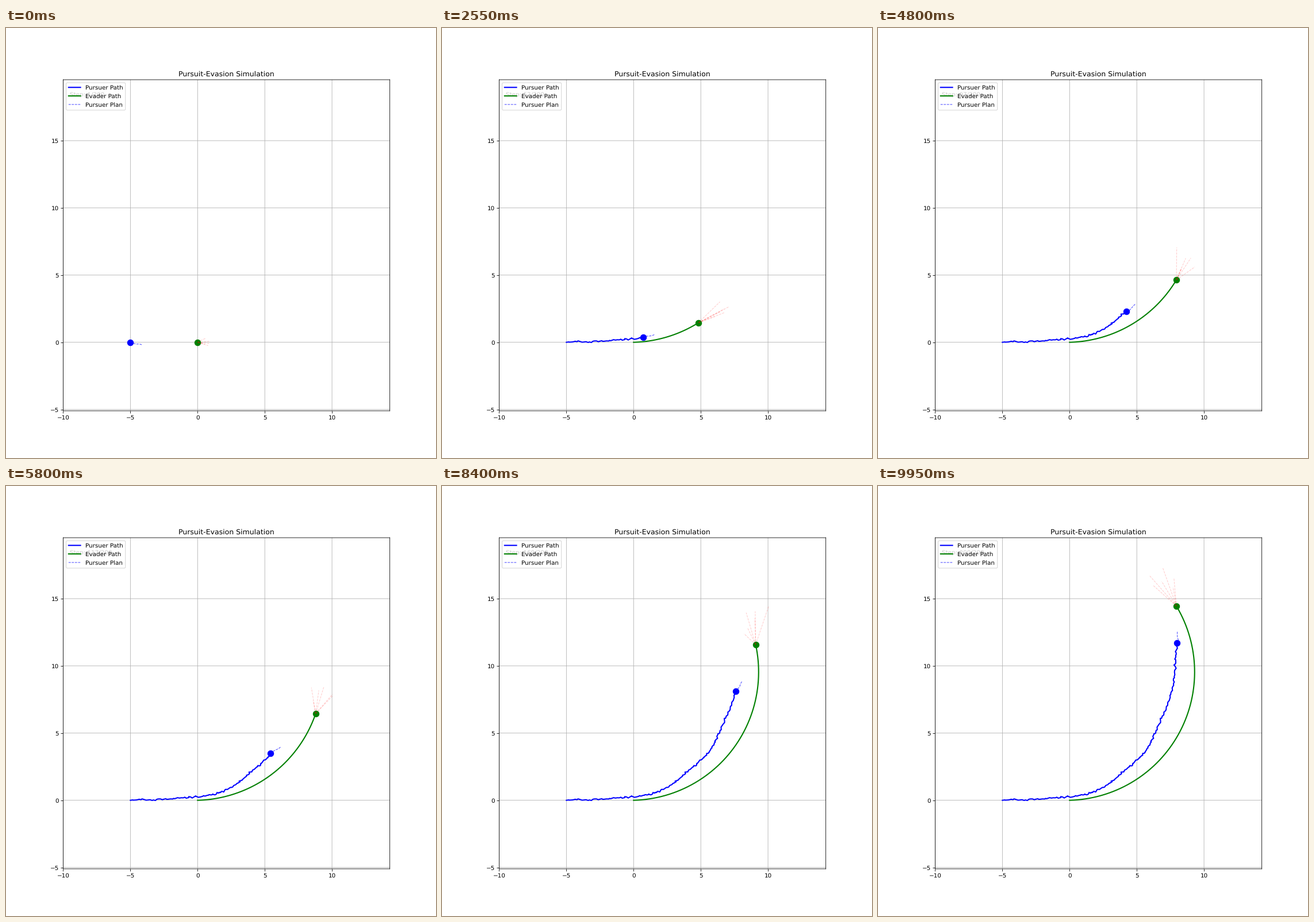
Write a matplotlib script that moves like this. It is 748 px wide and 748 px high and loops after 10 s.

```python
import numpy as np
import matplotlib.pyplot as plt
from matplotlib.animation import FuncAnimation

# Unsnapped, unhinted drawing gives soft, scaled-down edges
plt.rcParams["path.snap"] = False
plt.rcParams["text.hinting"] = "none"

STEPS = 200
SPEED = 0.1            # evader distance per step
TURN = np.pi / 300     # evader heading change per step
HEADING = 0.026
RAYS = 6

# Key moments of the chase: step, x, y
KEYS = np.array([
    (0, -5.0, 0.0), (27, -1.56, 0.14), (76, 2.6, 1.03), (99, 4.44, 2.5),
    (116, 5.47, 3.45), (140, 6.42, 5.18), (168, 7.59, 8.1),
    (199, 8.0, 11.73),
])


def polar(angle, length):
    return np.column_stack([np.cos(angle), np.sin(angle)]) * np.c_[length]


def evader_track():
    angle = HEADING + TURN * np.arange(STEPS + 1)
    x = np.sin(angle) - np.sin(HEADING)
    y = np.cos(HEADING) - np.cos(angle)
    return SPEED / TURN * np.column_stack([x, y])


def hermite(t, knots, values):
    """Smooth curve through the values at the given knots."""
    slopes = np.gradient(values, knots)
    i = np.clip(np.searchsorted(knots, t, side="right") - 1,
                0, len(knots) - 2)
    h = knots[i + 1] - knots[i]
    u = (t - knots[i]) / h
    ease = u * u * (3 - 2 * u)
    return (values[i] * (1 - ease) + values[i + 1] * ease
            + h * u * (1 - u) * ((1 - u) * slopes[i] - u * slopes[i + 1]))


def pursuer_track():
    steps = np.arange(STEPS)
    track = np.column_stack([hermite(steps, KEYS[:, 0], KEYS[:, k])
                             for k in (1, 2)])
    wobble = np.random.default_rng(4).normal(0, 0.033, track.shape)
    wobble[0] = 0
    return track + wobble


EVADER = evader_track()
PURSUER = pursuer_track()


def plan_points(step, rng):
    """Four short moves aimed roughly at the evader."""
    start = PURSUER[step]
    dx, dy = EVADER[step] - start
    angles = np.arctan2(dy, dx) + rng.normal(0, 0.1) + rng.normal(0, 0.2, 4)
    moves = polar(angles, np.full(4, 0.23))
    return np.vstack([start, start + np.cumsum(moves, axis=0)])


def fan_tips(step, rng):
    """Ends of the predicted evader moves, longer after the start."""
    spread = np.clip(rng.normal(0, 0.32, RAYS), -0.6, 0.6)
    reach = np.clip(rng.normal(1.75, 0.55, RAYS), 0.9, 3.0)
    reach *= min(1, 0.45 + step / 30)
    return EVADER[step] + polar(HEADING + TURN * step + spread, reach)


fig, ax = plt.subplots(figsize=(10, 10), dpi=74.8)
# A quarter pixel right and down
fig.subplots_adjust(left=0.1253, right=0.9003, bottom=0.1097, top=0.8797)
ax.set_xlim(-10, EVADER[:, 0].max() + 5)
ax.set_ylim(-5.1, EVADER[:, 1].max() + 5)
ax.set_aspect("equal")
ax.grid(True)
ax.set_title("Pursuit-Evasion Simulation")

blue_path, = ax.plot([], [], "b-", lw=2, label="Pursuer Path")
green_path, = ax.plot([], [], "g-", lw=2, label="Evader Path")
blue_dot, = ax.plot([], [], "bo", ms=10)
green_dot, = ax.plot([], [], "go", ms=10)
plan, = ax.plot([], [], "b--", lw=1, alpha=0.7, label="Pursuer Plan")
fan = [ax.plot([], [], "r--", lw=1, alpha=0.2)[0] for _ in range(RAYS)]
counter = ax.text(0.02, 0.95, "", transform=ax.transAxes)
ax.legend(loc="upper left")


def update(step):
    rng = np.random.default_rng(step + 40)
    prey = EVADER[step]
    for track, path, dot in ((PURSUER, blue_path, blue_dot),
                             (EVADER, green_path, green_dot)):
        path.set_data(*track[:step + 1].T)
        dot.set_data(*track[step:step + 1].T)
    plan.set_data(*plan_points(step, rng).T)
    for line, tip in zip(fan, fan_tips(step, rng)):
        line.set_data(*np.column_stack([prey, tip]))
    counter.set_text(f"Step: {step + 1}/{STEPS}")
    return [blue_path, green_path, blue_dot, green_dot, plan, *fan, counter]


anim = FuncAnimation(fig, update, frames=STEPS, interval=50,
                     repeat=True, repeat_delay=0)
plt.show()
```
